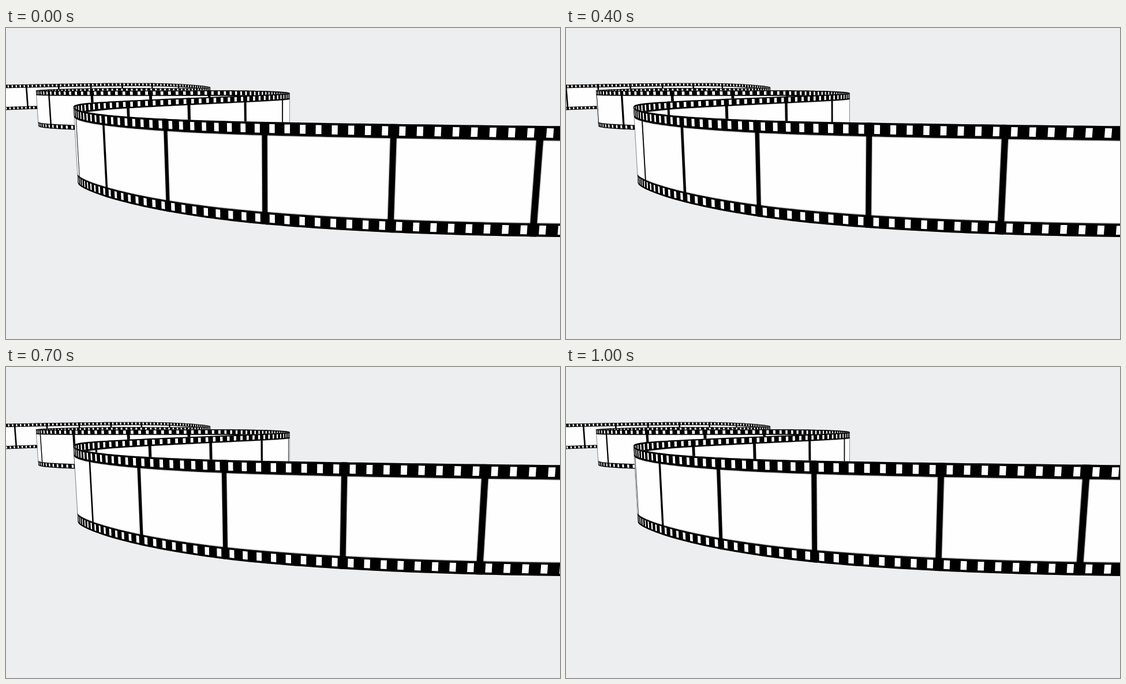
Recreate the animation shown at these times as an HTML page with a canvas. Size 960 by 540 pixels, loop 1.1 s.

```html
<!DOCTYPE html>
<html lang="en">
<head>
<meta charset="utf-8">
<title>Film strip</title>
<style>
  html, body { margin: 0; width: 100%; height: 100%; overflow: hidden; background: #edeef0; }
  canvas { display: block; }
</style>
</head>
<body>
<canvas id="stage" width="960" height="540"></canvas>
<script>
const ctx = document.getElementById('stage').getContext('2d');

// Key points along the ribbon, s counted in picture lengths.
// x, top and bottom are [value, slope]; the ribbon turns where x has no slope.
const key = (s, x, top, bottom) => ({ s, x, top, bottom });
const KEYS = [
  key(-30,   [-20, 54],    [99, -1],     [143, -2]),
  key(-25,   [253, 50],    [95.8, 0.5],  [137, 0]),
  key(-21.6, [354, 0],     [103, 2],     [148, 2]),
  key(-18.3, [200, -68],   [104.3, 0],   [157, 3]),
  key(-14.8, [52, 0],      [108.3, 1],   [170.5, 6]),
  key(-11,   [352, 93],    [108.3, -.2], [181, 1.5]),
  key(-7.6,  [491.5, 0],   [113, 2],     [195, 4]),
  key(-4,    [211, -101],  [126, 5],     [228, 12]),
  key(-2.35, [117, 0],     [136.5, 11],  [269.5, 10]),
  key(1,     [448, 206],   [163, 4],     [341, 18]),
  key(3.5,   [1063, 277],  [171.5, 3],   [363.7, 1.5])
];
const BAND = 0.13, FOOT = 0.12;
const HOLES = 8, HOLE_HALF = 0.18 / HOLES, BAR_HALF = 0.022;
const SOFT_S = 0.005, SOFT_V = 0.007;   // soft fringe of the print
const LENS_X = 475, LENS_LEAN = 1.65e-4; // uprights lean towards the lens axis
const LOOP = 1100, STEP = 100;
const INK = '#000', FRINGE = 'rgba(0,0,0,.3)', PAPER = '#fefefe';

function hermite([p, m], [q, n], t, h) {
  const u = 1 - t;
  return u * u * (1 + 2 * t) * p + t * t * (3 - 2 * t) * q + t * u * h * (u * m - t * n);
}

// Point at distance s along the ribbon, v = 0 top to 1 bottom
function at(s, v) {
  let i = 0;
  while (i < KEYS.length - 2 && s > KEYS[i + 1].s) i++;
  const a = KEYS[i], b = KEYS[i + 1], h = b.s - a.s;
  const value = name => hermite(a[name], b[name], (s - a.s) / h, h);
  const x = value('x'), top = value('top'), drop = (value('bottom') - top) * v;
  return [x + (LENS_X - x) * drop * LENS_LEAN, top + drop];
}

function ribbonPath(a, b, v0, v1, n = 1) {
  const path = new Path2D();
  for (let i = 0; i <= n; i++) path.lineTo(...at(a + (b - a) * i / n, v0));
  for (let i = n; i >= 0; i--) path.lineTo(...at(a + (b - a) * i / n, v1));
  path.closePath();
  return path;
}

// The ribbon itself never moves, so its outlines are built once per stretch
const last = KEYS.length - 1;
const turns = KEYS.filter((k, i) => i === 0 || i === last || k.x[1] === 0).map(k => k.s);
const sections = turns.slice(1).map((b, i) => {
  const a = turns[i];
  const strip = (v0, v1) => ribbonPath(a, b, v0, v1, Math.ceil((b - a) * 16));
  return {
    a, b,
    body: strip(0, 1),
    fringes: [strip(0, BAND + SOFT_V), strip(1 - FOOT - SOFT_V, 1)],
    bands: [strip(0, BAND), strip(1 - FOOT, 1)],
    rim: ribbonPath(a, a, 0, 1)
  };
});

function fillAll(paths, color) {
  ctx.fillStyle = color;
  paths.forEach(path => ctx.fill(path));
}

function patch(sec, s, half, v0, v1, color) {
  const a = Math.max(sec.a, s - half), b = Math.min(sec.b, s + half);
  if (a < b) fillAll([ribbonPath(a, b, v0, v1)], color);
}

function drawSection(sec, phase) {
  fillAll([sec.body], PAPER);
  ctx.strokeStyle = 'rgba(0,0,0,.25)';
  ctx.stroke(sec.rim);
  fillAll(sec.fringes, FRINGE);
  fillAll(sec.bands, INK);

  for (let s = Math.floor(sec.a) - 1 + phase; s < sec.b + 1; s++) {
    patch(sec, s, BAR_HALF + SOFT_S, BAND, 1 - FOOT, FRINGE);
    patch(sec, s, BAR_HALF, 0, 1, INK);
    for (let i = 0; i < HOLES; i++) {
      const mid = s + (i + 0.5) / HOLES;
      patch(sec, mid, HOLE_HALF, BAND * 0.16, BAND * 0.82, PAPER);
      patch(sec, mid, HOLE_HALF, 1 - FOOT * 0.84, 1 - FOOT * 0.17, PAPER);
    }
  }
}

function draw(phase) {
  ctx.fillStyle = '#edeef0';
  ctx.fillRect(0, 0, 960, 540);
  sections.forEach(sec => drawSection(sec, phase));
}

const start = performance.now();
let shown = -1;

function tick() {
  const t = (performance.now() - start) % LOOP;
  const step = t < 2 * STEP ? 0 : Math.floor(t / STEP); // the first pose holds twice as long
  if (step !== shown) draw(step * STEP / LOOP);
  shown = step;
  requestAnimationFrame(tick);
}
tick();
</script>
</body>
</html>
```
